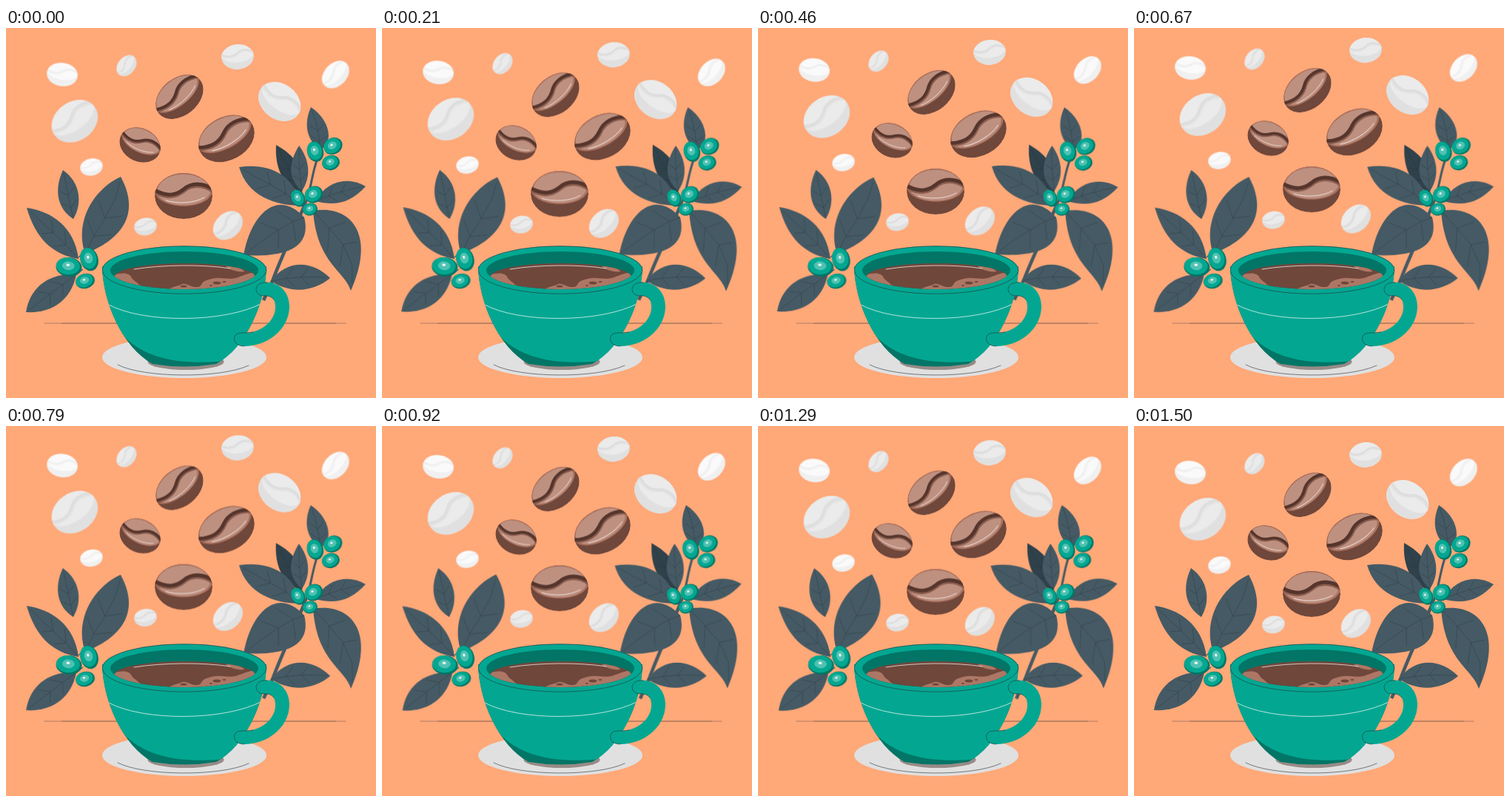
Write an HTML page that moves like this. It is 500x500 px and loops after 1.54 s.

```html
<!DOCTYPE html>
<html lang="en">
<head>
<meta charset="utf-8">
<title>Coffee time</title>
<style>
  html, body { margin: 0; width: 100%; height: 100%; overflow: hidden; background: #ffa878; }
  svg { display: block; width: 100%; height: 100%; }
  .line { fill: none; stroke: #263238; stroke-width: .6; stroke-linecap: round; }
  .vein { fill: none; stroke: #263238; stroke-width: .5; opacity: .7; }
  .shine { fill: none; stroke: #fff; stroke-width: .7; stroke-linecap: round; }
  #left { transform-origin: 97px 297px; }
  #right { transform-origin: 400px 253px; }
</style>
</head>
<body>
<svg viewBox="0 0 500 500">
  <defs>
    <clipPath id="beanClip"><ellipse rx="39" ry="31"/></clipPath>
    <clipPath id="bowlClip"><path d="M130 322C131 372 158 432 198 454Q241 461 284 454C324 432 351 372 352 322Z"/></clipPath>
    <clipPath id="wallClip"><ellipse cx="241" cy="327.5" rx="100" ry="25.5"/></clipPath>
    <clipPath id="coffeeClip"><ellipse cx="241.5" cy="336" rx="95" ry="18"/></clipPath>
  </defs>

  <path class="line" d="M76 399H445"/>
  <path class="line" d="M52 399H76M445 399H459" opacity=".6"/>
  <g id="left"></g>
  <g id="right"></g>

  <g id="saucer">
    <ellipse cx="241" cy="445" rx="111" ry="28" fill="#e0e0e0"/>
    <path class="line" d="M151 455C185 473 290 474 328 456"/>
    <ellipse cx="243" cy="451" rx="51.5" ry="11" fill="#978b87"/>
  </g>

  <g id="cup">
    <g clip-path="url(#bowlClip)">
      <path fill="#027566" d="M120 310H360V470H120Z"/>
      <path fill="#03a791" d="M130 310V350C140 408 172 462 296 450L360 400V310Z"/>
      <path class="shine" d="M139 374C185 399 295 399 346 372"/>
    </g>
    <path fill="#03a791" d="M345 344C367 341 383 355 383 377C382 409 352 430 322 430C312 430 307 424 309 417C311 411 318 412 325 412C345 411 364 396 364 377C364 366 359 361 348 362C336 361 334 347 345 344Z"/>
    <path class="line" d="M353 344C334 342 334 361 348 362C354 361 359 363 362 367M334 411C320 413 312 410 309 417C307 424 312 430 322 430"/>
    <ellipse cx="241" cy="327" rx="111" ry="32.5" fill="#03a791"/>
    <ellipse class="line" cx="241" cy="327" rx="110.7" ry="32.2"/>
    <g clip-path="url(#wallClip)">
      <path fill="#027566" d="M130 295H352V360H130Z"/>
      <g clip-path="url(#coffeeClip)">
        <path fill="#6f473b" d="M140 310H345V360H140Z"/>
        <path fill="#ad7765" d="M146 334C156 330 166 331 169 336C171 341 177 343 182 349L150 350ZM297 322C307 320 322 326 322 329C315 331 300 326 297 322ZM218 354C228 348 233 349 238 346C246 344 249 351 259 350C266 349 262 344 271 341C288 334 298 341 310 338C320 335 326 331 340 330V358H218Z"/>
        <g fill="#6f473b">
          <ellipse cx="285" cy="344.500" rx="5.500" ry="2"/>
          <ellipse cx="295" cy="343" rx="2.500" ry="1.100"/>
          <ellipse cx="240" cy="349" rx="4.500" ry="1.500"/>
          <ellipse cx="277" cy="348" rx="2" ry="1"/>
        </g>
        <path class="shine" d="M173 326C210 320 265 319 303 325"/>
      </g>
    </g>
  </g>
  <g id="beans"></g>
</svg>

<script>
const $ = id => document.getElementById(id);

// Each leaf is two curves: tip to base, then base back to tip.
function leaf(d, fill = '#455a64') {
  const n = d.match(/[\d.]+/g).map(Number);
  const pt = (from, t) => [0, 1].map(k => {
    const [a, b, c, e] = [0, 2, 4, 6].map(j => n[from + j + k]);
    const u = 1 - t;
    return u * u * u * a + 3 * u * u * t * b + 3 * u * t * t * c + t * t * t * e;
  });
  const mix = (p, q, f) => p.map((v, k) => v + (q[k] - v) * f);
  const edge = (side, t) => side ? pt(6, 1 - t) : pt(0, t);
  const mid = t => mix(edge(0, t), edge(1, t), .5);
  let veins = 'M' + [.06, .25, .5, .75, 1].map(mid).join('L');
  for (const t of [.34, .58])
    for (const side of [0, 1]) {
      const root = mid(t + .16);
      veins += `M${root}L${mix(root, edge(side, t), .78)}`;
    }
  return `<path fill="${fill}" d="${d}Z"/><path class="vein" d="${veins}"/>`;
}

const oval = (x, y, rx, ry, fill) =>
  `<ellipse cx="${x}" cy="${y}" rx="${rx}" ry="${ry}" fill="${fill}"/>`;

const berry = ([x, y, rx, ry, turn]) =>
  `<g transform="translate(${x} ${y}) rotate(${turn})">` +
  oval(0, 0, rx, ry, '#027566') +
  oval(-.07 * rx, -.09 * ry, .91 * rx, .89 * ry, '#03a791') +
  oval(-.05 * rx, -.12 * ry, .48 * rx, .46 * ry, '#4fc1b2') +
  oval(-.08 * rx, -.2 * ry, .14 * rx, .13 * ry, '#e6f7f4') + '</g>';

const stem = (d, w) => `<path fill="none" stroke="#455a64" stroke-width="${w}" d="${d}"/>`;

$('left').innerHTML =
  stem('M98 310L108 300M94 334L104 326', 1.2) +
  leaf('M155 201C118 218 92 262 107 305C140 292 188 262 155 201') +
  leaf('M77 192C64 220 70 245 91 258C104 236 100 208 77 192') +
  leaf('M28 243C62 248 92 268 98 312C62 306 40 284 28 243') +
  leaf('M27 384C32 352 56 331 95 333C88 368 62 386 27 384') +
  [[107, 342, 13, 10, -15], [85, 323, 17.5, 13, 5], [112.5, 312.5, 12, 16, -15]].map(berry).join('');

$('right').innerHTML =
  leaf('M365 158C363 190 375 215 400 222C404 190 390 172 365 158', '#2f414a') +
  stem('M421 176C412 200 412 225 402 243', 3) +
  stem('M404 238C390 272 374 305 360 342L348 368', 4.5) +
  leaf('M412 107C402 130 406 150 424 165C444 156 438 124 412 107') +
  leaf('M315 188C352 182 390 196 398 240C362 240 326 226 315 188') +
  leaf('M396 159C380 185 382 205 400 220C413 200 410 178 396 159') +
  leaf('M486 214C462 200 434 206 418 234C448 242 468 234 486 214') +
  leaf('M466 355C458 328 420 318 415 247C462 238 502 275 466 355') +
  leaf('M321 307C330 255 365 215 403 256C414 300 372 310 321 307') +
  leaf('M438 338C414 314 380 312 358 342C386 360 416 356 438 338') +
  [[418, 167, 11, 14, -15], [442, 159.5, 13, 11, -30], [439, 182, 12, 10, -15],
   [395, 230, 9, 12, -25], [416, 225, 12.5, 11, -30], [411, 245, 10, 8.5, -10]].map(berry).join('');

// under side, face rim, face, seam shade, seam
const tones = {
  brown: ['#6f473b', '#a9705d', '#be9080', '#8a5d4f', '#55352c'],
  grey: ['#e0e0e0', '#ebebeb', '#ebebeb', '#e6e6e6', '#dedede'],
  white: ['#f0f0f0', '#fafafa', '#fafafa', '#f6f6f6', '#f0f0f0']
};
const face = 'M-39 -5C-32 20 32 20 39 -5C36 -40 -36 -40 -39 -5Z';
const seam = 'M-41 -9C-22 2 -10 -1 0 -9C10 -18 26 -19 41 -8';

function bean([tone, x, y, rx, ry, turn]) {
  const [under, rim, top, shade, dark] = tones[tone];
  const shine = tone === 'brown' ? '<path class="shine" d="M-24 6C-8 11 14 10 28 2"/>' : '';
  return `<g transform="translate(${x} ${y}) rotate(${turn}) scale(${rx / 39} ${ry / 31})" clip-path="url(#beanClip)">
    <ellipse rx="39" ry="31" fill="${under}"/>
    <path fill="${rim}" d="${face}"/>
    <path fill="${top}" transform="translate(0 -.5) scale(.92)" d="${face}"/>
    <g fill="none"><path stroke="${shade}" stroke-width="6" transform="translate(0 2)" d="${seam}"/>
    <path stroke="${dark}" stroke-width="5" d="${seam}"/></g>${shine}</g>`;
}

$('beans').innerHTML = [
  ['brown', 234.5, 93, 36, 25.3, -39],
  ['brown', 181, 158, 28.7, 22.5, 25],
  ['brown', 298, 149.5, 40, 29.2, -28],
  ['brown', 240, 227, 39, 31, 0],
  ['grey', 93, 126, 33.5, 26.6, -35],
  ['grey', 369.5, 99.5, 31, 24, 36],
  ['grey', 313, 39, 22, 17, -5],
  ['grey', 300, 267, 22.5, 17, -42],
  ['grey', 163, 51, 16, 11.8, -50],
  ['grey', 188.5, 268.5, 15.6, 12, -10],
  ['white', 76, 63, 21.2, 16, 8],
  ['white', 445.5, 63, 21.5, 15.5, -46],
  ['white', 115.5, 188, 15.6, 11.8, -12]
].map(bean).join('');

// [ms, transform, steps until the next key], 24 steps per second
const LOOP = 1540;
function play(id, keys) {
  $(id).animate(
    keys.map(([ms, transform, n]) => ({ offset: ms / LOOP, transform, easing: n ? `steps(${n})` : 'linear' })),
    { duration: LOOP, iterations: Infinity, delay: -4 });
}

const up = y => `translateY(${y}px)`, turn = a => `rotate(${a}deg)`;
const sway = [[0, turn(0), 9], [375, turn(1), 18], [1125, turn(-1), 9], [1500, turn(0)], [LOOP, turn(0)]];
play('beans', [[0, up(0), 18], [750, up(-10), 18], [1500, up(0)], [LOOP, up(0)]]);
play('left', sway);
play('right', sway);
</script>
</body>
</html>
```
